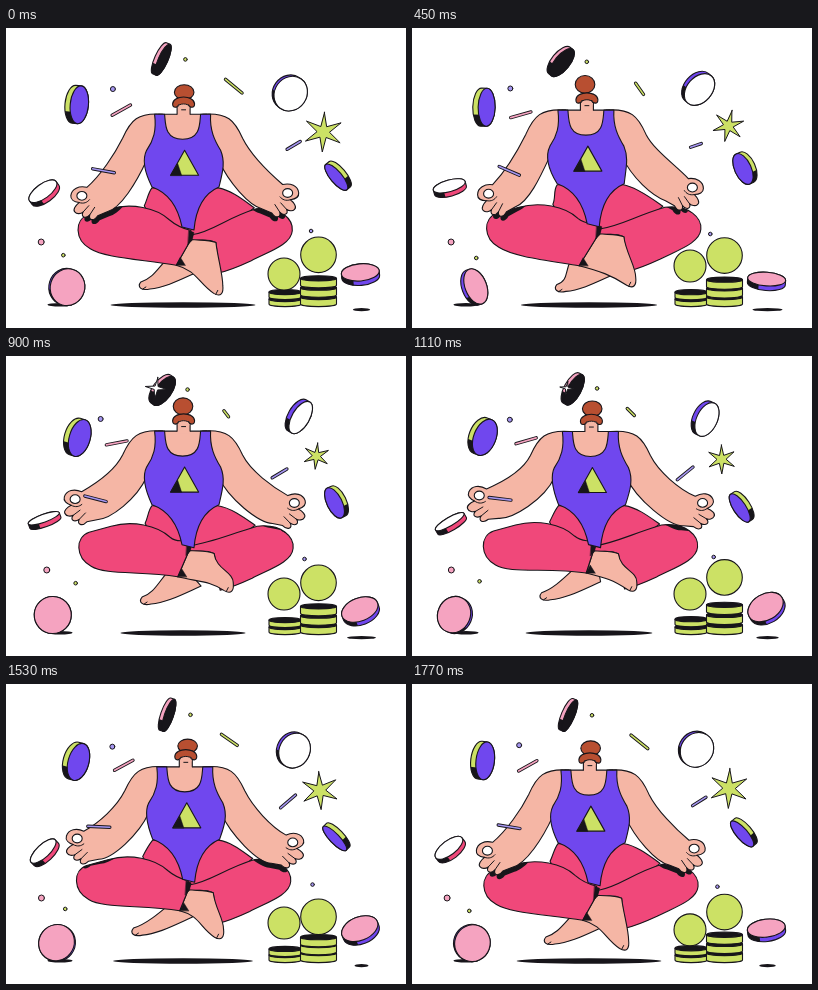
An HTML page with a canvas for the animation above (1.8 s loop, 400 by 300 pixels).

```html
<!DOCTYPE html>
<html lang="en">
<head>
<meta charset="utf-8">
<title>Floating meditation</title>
<style>
html, body { margin: 0; width: 100%; height: 100%; overflow: hidden; background: #fff; }
canvas { display: block; width: 400px; height: 300px; }
</style>
</head>
<body>
<canvas id="stage"></canvas>
<script>
const LOOP = 1800, STEP = 30, TAU = Math.PI * 2, RAD = Math.PI / 180;
const INK = '#17151a', SKIN = '#f5b6a5', PINK = '#f0487a', PURPLE = '#7047ee',
  GREEN = '#cce165', ROSE = '#f5a3c0', LILAC = '#a596f0', HAIR = '#b84f31', WHITE = '#fff';

const canvas = document.getElementById('stage');
const ctx = canvas.getContext('2d');
const ratio = window.devicePixelRatio || 1;
canvas.width = 400 * ratio;
canvas.height = 300 * ratio;
ctx.scale(ratio, ratio);
ctx.lineJoin = ctx.lineCap = 'round';

let phase = 0; // 0..1 through the loop

// Everything floats on cosine waves; peak is the phase of the highest value.
const sway = (mid, amp, peak, cycles = 1) => mid + amp * Math.cos(TAU * cycles * (phase - peak));
const pulse = (from, to) => phase > from && phase < to ? Math.sin(Math.PI * (phase - from) / (to - from)) : 0;

// Point helper: offsets from an anchor, optionally turned and mirrored.
function anchor(x, y, deg = 0, flip = 1) {
  const c = Math.cos(deg * RAD), s = Math.sin(deg * RAD);
  return (dx = 0, dy = 0) => ` ${x + flip * (dx * c - dy * s)} ${y + dx * s + dy * c} `;
}

function draw(shape, fill, line = 1.1) {
  const path = typeof shape === 'string' ? new Path2D(shape) : shape;
  if (fill) { ctx.fillStyle = fill; ctx.fill(path); }
  if (line) { ctx.strokeStyle = INK; ctx.lineWidth = line; ctx.stroke(path); }
  return path;
}

function oval(x, y, rx, ry, fill, line) {
  const p = new Path2D();
  p.ellipse(x, y, rx, ry, 0, 0, TAU);
  draw(p, fill, line);
}

function star(x, y, points, outer, inner, turn, fill) {
  if (outer < 0.5) return;
  const p = new Path2D();
  for (let i = 0; i < points * 2; i++) {
    const a = turn * RAD + i * Math.PI / points - Math.PI / 2;
    const r = i % 2 ? outer * inner : outer;
    p.lineTo(x + r * Math.cos(a), y + r * Math.sin(a));
  }
  p.closePath();
  draw(p, fill, 1);
}

// A disc with a rim: tilt narrows the face, turn spins it on the stage.
function coin(r, depth, face, side, x, y, tilt, turn, dark = 0.4) {
  const a = r * Math.cos(tilt * RAD);
  const shift = depth * Math.sin(tilt * RAD) / 2, half = Math.abs(shift);
  ctx.save();
  ctx.translate(x, y);
  ctx.rotate(turn * RAD);
  const hull = new Path2D();
  hull.ellipse(half, 0, a, r, 0, -Math.PI / 2, Math.PI / 2);
  hull.ellipse(-half, 0, a, r, 0, Math.PI / 2, Math.PI * 1.5);
  hull.closePath();
  draw(hull, side, 0);
  ctx.save();
  ctx.clip(hull);
  ctx.fillStyle = INK;
  ctx.fillRect(-40, r * dark, 80, 40);
  ctx.restore();
  draw(hull);
  oval(shift, 0, a, r, face);
  ctx.restore();
}

function coins() {
  coin(17, 4, INK, ROSE, sway(155.7, 7, .74), sway(32.5, 1.8, .4), sway(68, 7, .9), sway(30, 11, .34));
  coin(19, 6, PURPLE, GREEN, sway(71, 1, .3), sway(78.9, 2.4, .48), sway(59, 5, .17), sway(11, 11, .67));
  coin(18, 5, WHITE, PURPLE, sway(288.3, 5, .57), sway(62.7, 3.3, .87), sway(44, 17, .48), sway(33, 9, .2));
  coin(16.5, 5, WHITE, PINK, sway(38.4, .6, .7), sway(164.8, 4.7, .76), sway(-70, 6, .02), sway(62, 15, .34));
  coin(16.5, 5, PURPLE, GREEN, sway(331.3, 1.8, .18), sway(146.8, 6.8, .77), sway(-66, 7, .33), sway(-33, 11, .36));
  coin(18.5, 4, ROSE, PURPLE, sway(53.8, 11, .14), 259, sway(10, 46, .21), sway(9, 31, .79));
  coin(19, 5, ROSE, PURPLE, 354.5, sway(251, 5, .42), sway(-58, 12, .68), sway(77, 19, .18));
}

function stick(color, x, y, length, turn) {
  const dx = length / 2 * Math.cos(turn * RAD), dy = length / 2 * Math.sin(turn * RAD);
  for (const [style, width] of [[INK, 3.4], [color, 1.6]]) {
    ctx.strokeStyle = style;
    ctx.lineWidth = width;
    ctx.beginPath();
    ctx.moveTo(x - dx, y - dy);
    ctx.lineTo(x + dx, y + dy);
    ctx.stroke();
  }
}

function confetti() {
  const dot = (color, r, x, y) => oval(x, y, r, r, color, 1);
  stick(GREEN, sway(224, 5.2, .12), sway(58, 2.8, .24), sway(14.5, 7, .98), sway(46, 11, .35));
  stick(LILAC, sway(93.5, 5.5, .12), 142.8, 22, sway(12.5, 11, .28));
  stick(LILAC, sway(280.6, 7.8, .07), 117.4, sway(16.2, 5, .72), sway(-31, 12, .25));
  dot(LILAC, 2.5, sway(100.8, 6.6, .94), sway(62, 1.8, .66));
  dot(GREEN, 1.8, sway(180.5, 5.8, .72), sway(32.5, 1.7, .36));
  dot(ROSE, 3, sway(38, 3, .44), 214);
  dot(GREEN, 1.8, sway(63.5, 6.2, .48), sway(227.2, 2.8, .25));
  dot(LILAC, 1.8, sway(301.8, 4.8, .87), sway(203, 3, .25));
  star(sway(313.8, 4.3, .1), sway(102, 4.6, .82), 6, sway(16.7, 3.4, .97), .31, sway(4, 9, .27), GREEN);
}

function stack(x, rx, count, height, gap) {
  for (let i = 0; i < count; i++) {
    const y = 276 - i * gap, top = y - height;
    const side = new Path2D();
    side.ellipse(x, y, rx, 2.6, 0, 0, Math.PI);
    side.lineTo(x - rx, top);
    side.lineTo(x + rx, top);
    side.closePath();
    draw(side, GREEN);
    oval(x, top, rx, 2.6, INK);
  }
}

// The piles bounce twice per loop, the left ball drops once.
function savings() {
  stack(279, 16, 2, 5, sway(6.9, .9, .12, 2));
  stack(312.5, 18, 3, 7, sway(9, 1.1, .1, 2));
  oval(278, 238 + 8 * Math.max(0, sway(0, 1, 0)) ** 4, 16, 16, GREEN);
  oval(312.5, sway(227.2, -5.8, .12, 2), 17.8, 17.8, GREEN);
}

// Draws the lower body and returns the legs' area for the hands' shadows.
function legs(H) {
  const G = anchor(sway(.7, 2.2, .28), sway(-3.5, 6.5, .1));
  const qx = sway(184, 3, .2), qy = sway(199, 9, .05);
  const Q = anchor(qx, qy), N = anchor(qx + 25, qy + 7);
  const W = anchor(sway(171, 4, .72), sway(229, 12, .13));
  const A = anchor(sway(220, 5.5, .45), sway(251, 17, .07));
  const B = anchor(sway(134.5, 9.5, .26), sway(250.5, 11, .15));
  // back foot, hips, far leg, front foot, near leg
  draw(`M${W(0,-15)}C${W(-18,0)}${B(16,-8)}${B(1,-3)}C${B(-3,2)}${B(1,6)}${B(10,4)}C${B(25,3)}${B(42,-6)}${B(60,-14)}L${W(12,-4)}Z`, SKIN);
  draw(`M${H(-33,1)}C${H(-37,6)}${G(141,170)}${G(138,176)}L${G(150,200)}L${Q()}L${G(220,200)}L${G(248,178)}C${G(238,171)}${H(46,3)}${H(33,1)}Z`, PINK);
  const far = draw(`M${Q(2,-1)}C${Q(22,-4)}${G(220,188)}${G(250,179)}C${G(275,176)}${G(287,190)}${G(286,201)}C${G(285,215)}${G(262,222)}${G(245,231)}C${G(232,237)}${G(222,241)}${G(213,243)}L${N()}C${N(-8,-4)}${Q(10,5)}${Q(0,5)}Z`, PINK);
  draw(`M${Q(0,4)}C${Q(10,5)}${N(-8,-3)}${N()}C${N(2,16)}${A(2,-20)}${A(2,-9)}C${A(3,-1)}${A(0,3)}${A(-7,-1)}C${A(-22,-11)}${W(20,5)}${W()}Z`, SKIN);
  draw(`M${A(-5,0)}L${A(-3,-4)}M${B(3,4)}L${B(6,2)}`, null, 1);
  const near = draw(`M${G(104,179)}C${G(125,173)}${G(150,178)}${G(163,190)}C${G(170,196)}${Q(-8,-7)}${Q(0,-5)}L${Q(0,4)}L${W()}C${W(-37,-6)}${G(98,228)}${G(84,219)}C${G(68,210)}${G(68,190)}${G(82,185)}Z`, PINK);
  draw(`M${Q(-2,-5)}L${Q(3,-3)}L${Q(1,5)}L${Q(-3,9)}Z`, INK, .5);
  draw(`M${W()}L${W(4,-8)}L${W(9,0)}Z`, INK, .5);
  near.addPath(far);
  return near;
}

function arm(T, x, y, flip, lap) {
  const S = (dx, dy) => T(flip * dx, dy), P = anchor(x, y, sway(12, 13, .68), flip);
  const shape = new Path2D(`M${S(-20,0)}C${S(-45,-2)}${S(-52,6)}${S(-60,24)}C${S(-68,40)}${P(16,-22)}${P(4,-9)}
    C${P(-4,-10)}${P(-11,-6)}${P(-11,1)}C${P(-11,5)}${P(-7,7)}${P(-2,7)}
    C${P(-5,10)}${P(-8,15)}${P(-5,17)}C${P(-3,19)}${P(1,18)}${P(3,16)}
    C${P(1,21)}${P(6,23)}${P(10,18)}C${P(9,24)}${P(15,24)}${P(18,18)}L${P(27,13)}
    C${P(40,8)}${S(-46,68)}${S(-36,46)}L${S(-20,40)}Z`);
  // cast shadow on the lap
  ctx.save();
  ctx.clip(lap);
  ctx.translate(flip * 2, 4.5);
  draw(shape, INK, 0);
  ctx.restore();
  draw(shape, SKIN);
  draw(`M${P(3,16)}L${P(8,9)}M${P(10,18)}L${P(14,10)}M${P(-2,7)}C${P(3,8)}${P(6,6)}${P(8,3)}`, null, 1);
  oval(x, y, 5, 4.4, WHITE);
}

function torso(T, H) {
  draw(`M${T(-24,0)}L${T(24,0)}L${T(22,32)}L${T(-22,32)}Z`, SKIN);
  // neck, hair and face
  const F = (dx, dy) => T(dx + 1, dy - 11.5);
  draw(`M${F(-6.5,3)}L${F(-6.5,14)}L${F(6.5,14)}L${F(6.5,3)}Z`, SKIN, 0);
  draw(`M${F(-6.5,3)}L${F(-6.5,11.5)}M${F(6.5,3)}L${F(6.5,11.5)}`);
  oval(sway(177.6, 4.6, .77), sway(57.3, 7, .98), 9.8, sway(8, 1, .33), HAIR);
  draw(`M${F(-7,-5)}L${F(7,-5)}L${F(6,0)}L${F(-6,0)}Z`, INK, 0);
  draw(`M${F(-11,1)}C${F(-10,-8)}${F(10,-8)}${F(11,1)}C${F(11,6)}${F(6,5)}${F(5,2)}L${F(-5,2)}C${F(-6,5)}${F(-11,6)}${F(-11,1)}Z`, HAIR);
  draw(`M${F(-6,4)}C${F(-5,0)}${F(5,0)}${F(6,4)}L${F(5,8)}L${F(-5,8)}Z`, SKIN, 0);
  draw(`M${F(-6,4)}C${F(-5,0)}${F(5,0)}${F(6,4)}M${F(-2,7)}L${F(2,7)}`, null, 1);
  // leotard
  draw(`M${T(-28,0)}L${T(-18,0)}C${T(-17,10)}${T(-18,25)}${T(0,25)}C${T(18,25)}${T(17,10)}${T(18,0)}L${T(28,0)}
    C${T(27,16)}${T(32,26)}${T(38,36)}C${T(43,48)}${T(40,58)}${H(34,0)}C${H(20,6)}${H(11,20)}${H(9,43)}L${H(-3,40)}
    C${H(-7,20)}${H(-16,6)}${H(-33,0)}C${T(-37,60)}${T(-41,46)}${T(-36,36)}C${T(-29,26)}${T(-26,16)}${T(-28,0)}Z`, PURPLE);
  const E = (dx, dy) => T(dx + 2, dy + 36);
  draw(`M${E(0,0)}L${E(14,25)}L${E(-14,25)}Z`, GREEN);
  draw(`M${E(-14,25)}L${E(-7,13)}L${E(-3,25)}Z`, INK, .5);
}

function figure() {
  const T = anchor(sway(176.6, 2.7, .75), sway(80.7, 5.8, .04));
  const H = anchor(sway(179, .8, .75), sway(153.8, 5.5, .06));
  const lap = legs(H);
  arm(T, sway(72.5, 5.3, .14), sway(155.5, 16, .11), 1, lap);
  arm(T, sway(285, 5.7, .65), sway(156, 9.7, .06), -1, lap);
  torso(T, H);
}

function shadows() {
  oval(177, 277, sway(67.5, 5, .02), 2.8, INK, 0);
  oval(54, 276.7, 12.5, 1.7, INK, 0);
  oval(355.5, 281.7, sway(11.5, 4.5, .36), 1.6, INK, 0);
}

function render(t) {
  phase = Math.floor(t % LOOP / STEP) * STEP / LOOP;
  ctx.fillStyle = WHITE;
  ctx.fillRect(0, 0, 400, 300);
  shadows();
  stick(ROSE, sway(113, 4.8, .83), sway(84.5, 3.3, .38), 21, sway(-20, 10, .43));
  figure();
  savings();
  coins();
  confetti();
  // glints
  star(325.5, 214, 4, 17 * pulse(.03, .2), .24, 0, WHITE);
  star(sway(149.7, 7, .74), 32, 4, 11 * pulse(.32, .7), .22, 8, WHITE);
}

const start = performance.now();
function tick() {
  render(performance.now() - start);
  requestAnimationFrame(tick);
}
tick();
</script>
</body>
</html>
```
